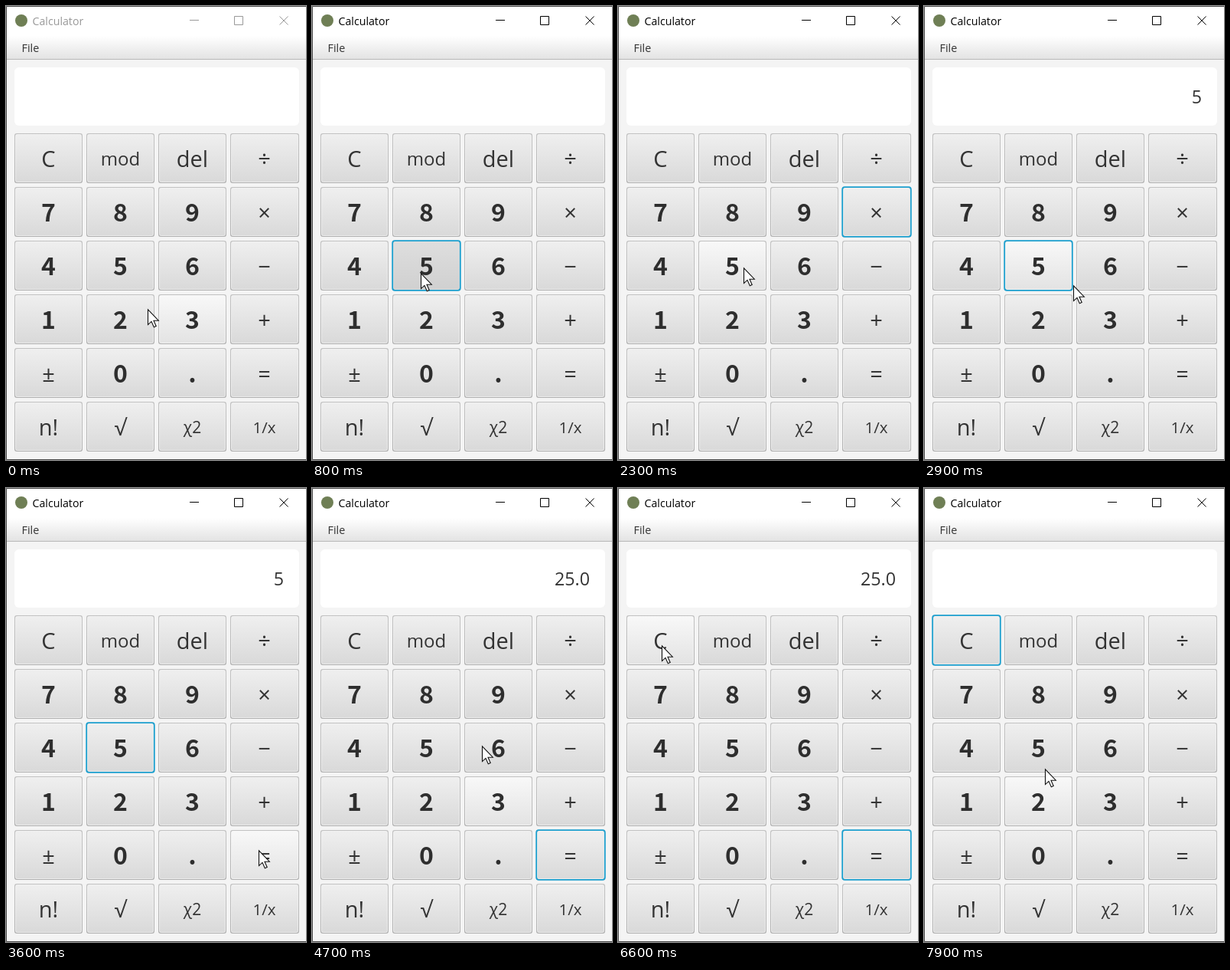
An HTML page for the animation above (8 s loop, 392x592 px).

```html
<!DOCTYPE html>
<html lang="en">
<head>
<meta charset="utf-8">
<title>Calculator</title>
<style>
  html, body { margin: 0; width: 100%; height: 100%; overflow: hidden; background: #f4f4f4; }
  svg { display: block; width: 392px; height: 592px; }
  text { font-family: "Open Sans", "Noto Sans", "DejaVu Sans", sans-serif; fill: #333; }
  .key text { text-anchor: middle; }
  .key .digit { font-family: "Noto Sans CJK JP", "Noto Sans CJK SC", "Noto Sans CJK", sans-serif; font-weight: bold; fill: #2e2e2e; }
  .edge { fill: url(#edge); }
  .face { fill: url(#normal); stroke: #f8f8f8; stroke-opacity: .75; }
  .hover .face { fill: url(#hover); stroke: #fff; }
  .pressed .face { fill: url(#pressed); stroke: #e4e4e4; }
  .ring { fill: none; stroke: #1b9fce; stroke-width: 1.8; visibility: hidden; }
  .focus .ring { visibility: visible; }
  #caption { fill: #000; }
  #controls { fill: none; stroke: #000; }
  .inactive #caption { fill: #999; }
  .inactive #controls { stroke: #999; }
</style>
</head>
<body>
<svg id="stage" viewBox="0 0 392 592">
  <defs>
    <linearGradient id="bar" x2="0" y2="1"><stop stop-color="#fff"/><stop offset="1" stop-color="#e3e3e3"/></linearGradient>
    <linearGradient id="edge" x2="0" y2="1"><stop stop-color="#c2c2c2"/><stop offset="1" stop-color="#b0b0b0"/></linearGradient>
    <linearGradient id="normal" x2="0" y2="1"><stop stop-color="#efefef"/><stop offset="1" stop-color="#d9d9d9"/></linearGradient>
    <linearGradient id="hover" x2="0" y2="1"><stop stop-color="#f8f8f8"/><stop offset="1" stop-color="#e3e3e3"/></linearGradient>
    <linearGradient id="pressed" x2="0" y2="1"><stop stop-color="#dedede"/><stop offset="1" stop-color="#d0d0d0"/></linearGradient>
  </defs>
  <rect width="392" height="592" fill="#f4f4f4"/>
  <rect width="392" height="39" fill="#fff"/>
  <rect y="39" width="392" height="30" fill="url(#bar)"/>
  <rect y="69" width="392" height="1" fill="#b9b9b9"/>
  <circle cx="20" cy="19" r="8" fill="#6f7f55"/>
  <text id="caption" x="34.5" y="25" font-size="14.2">Calculator</text>
  <path id="controls" d="M240 18.5h12M298.5 13.5h11v11h-11zM357.5 13.5l11 11m0-11l-11 11"/>
  <text x="20.5" y="60" font-size="14.4">File</text>
  <rect x="11" y="80" width="372" height="76" rx="6" fill="#fff"/>
  <text id="display" x="363" y="127" font-size="23.2" text-anchor="end"></text>
  <g id="keys"></g>
  <path d="M392 591.5H.5V.5H392" fill="none" stroke="#4a4a4a"/>
  <path id="cursor" d="M.5 .8V20.6L5 16.4 8.3 23.8 11.2 22.5 8 15.2H14.3Z" fill="#fff" stroke="#111" stroke-width="1.1"/>
</svg>
<script>
const $ = id => document.getElementById(id);
const LOOP = 8000, STEP = 100;
const LEFT = 11, TOP = 166, COL = 94, ROW = 70;

const labels = 'C mod del ÷ 7 8 9 × 4 5 6 − 1 2 3 + ± 0 . = n! √ χ2 1/x'.split(' ');
const sizes = { mod: 24, 'χ2': 21, '1/x': 20.5 };

function keyMarkup(label, i) {
  const x = LEFT + i % 4 * COL, y = TOP + Math.floor(i / 4) * ROW;
  const w = i % 4 === 3 ? 90 : 89;
  const digit = /^[\d.]$/.test(label);
  const size = digit ? 32 : sizes[label] || 29;
  return `<g class="key">
    <rect class="edge" x="${x}" y="${y}" width="${w}" height="65" rx="3"/>
    <rect class="face" x="${x + 1.5}" y="${y + 1.5}" width="${w - 3}" height="62" rx="2"/>
    <rect class="ring" x="${x + .2}" y="${y + .2}" width="${w - .4}" height="64.6" rx="3"/>
    <text class="${digit ? 'digit' : ''}" x="${x + 44.5}" y="${y + 33.5 + .367 * size}" font-size="${size}">${label}</text>
  </g>`;
}
$('keys').innerHTML = labels.map(keyMarkup).join('');
const keys = [...$('keys').children];

// each click: press time, key, display after release
const clicks = [
  [800, '5', '5'], [1700, '×', ''], [2700, '5', '5'], [3800, '=', '25.0'], [6700, 'C', '']
];

// pointer stops: arrival time, x, y, rest
const stops = [
  [-100, 215, 400], [0, 185, 395], [400, 142, 348, 500], [1200, 303, 322],
  [1300, 321, 284], [1400, 328, 269, 400], [2300, 164, 341, 500], [3300, 318, 457],
  [3500, 330, 472, 400], [4200, 318, 432], [4600, 232, 378], [4700, 222, 336],
  [5100, 94, 230], [5500, 57, 205, 1300], [7400, 190, 394], [7800, 166, 378], [7900, 158, 366]
];

function pointer(t) {
  const i = stops.findLastIndex(s => s[0] <= t);
  const [start, x, y, rest = 0] = stops[i];
  const [end, x2, y2] = stops[i + 1] || stops[i];
  const k = Math.max(0, t - start - rest) / (end - start - rest || 1);
  return [Math.round(x + (x2 - x) * k), Math.round(y + (y2 - y) * k)];
}

function keyAt([x, y]) {
  return Math.floor((y - TOP) / ROW) * 4 + Math.floor((x - LEFT) / COL);
}

function draw(now) {
  const t = Math.floor(now % LOOP / STEP) * STEP;
  const over = keyAt(pointer(t - STEP)); // highlight trails the pointer by one step
  const press = clicks.findLast(c => c[0] <= t);
  const release = clicks.findLast(c => c[0] + STEP <= t);
  const focused = press ? labels.indexOf(press[1]) : -1;
  keys.forEach((key, i) => {
    key.classList.toggle('hover', i === over);
    key.classList.toggle('focus', i === focused);
    key.classList.toggle('pressed', i === focused && press !== release);
  });
  $('stage').classList.toggle('inactive', !press);
  $('display').textContent = release ? release[2] : '';
  $('cursor').setAttribute('transform', `translate(${pointer(t)})`);
  requestAnimationFrame(() => draw(performance.now()));
}
draw(0);
</script>
</body>
</html>
```
